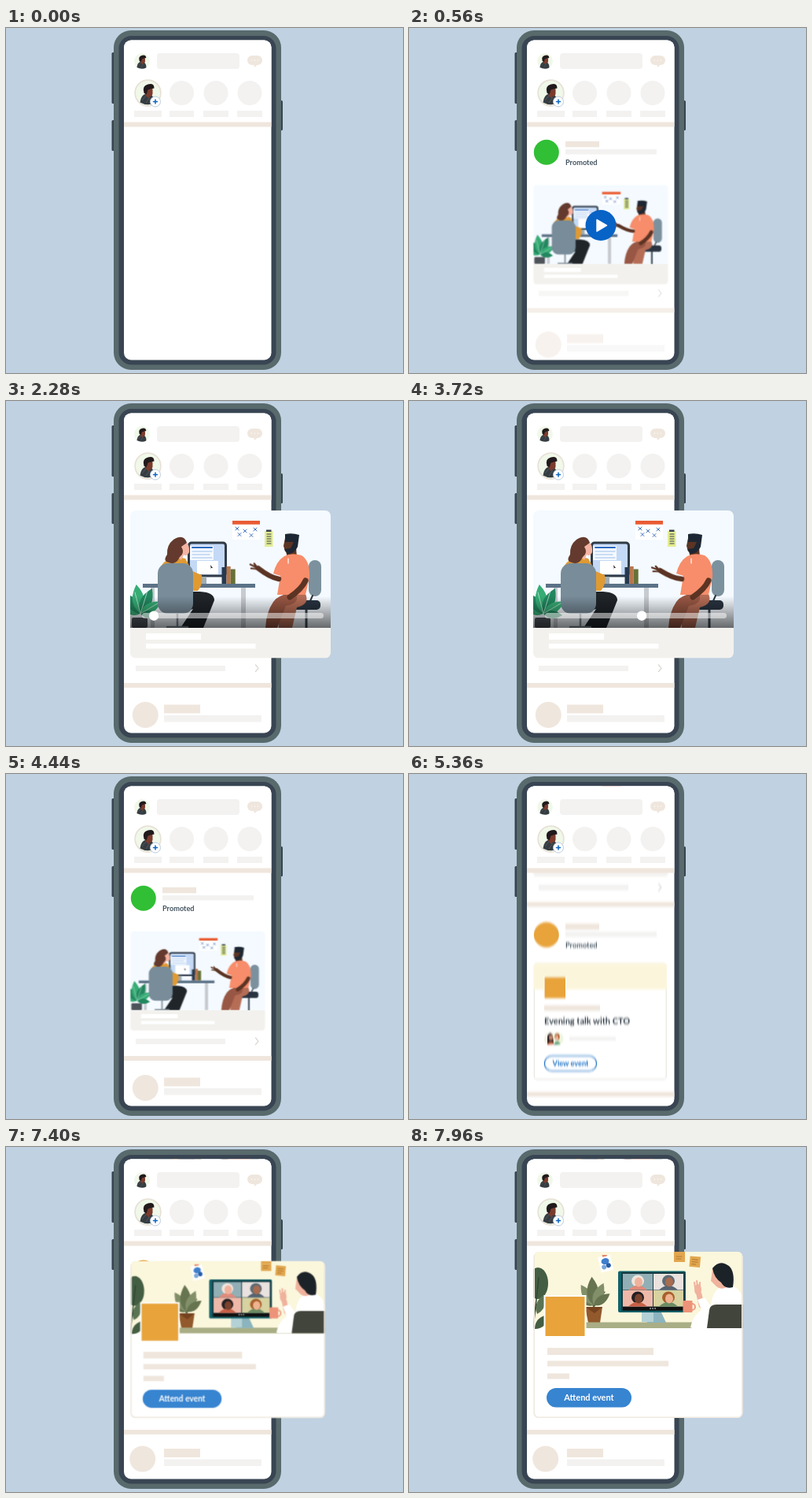
An HTML page for the animation above (8 s loop, 505x438 px).

```html
<!DOCTYPE html>
<html lang="en">
<head>
<meta charset="utf-8">
<title>Phone feed</title>
<style>
html, body { margin: 0; width: 100%; height: 100%; overflow: hidden; background: #c0d1e1; }
svg { display: block; width: 505px; height: 438px; }
text { font-family: Lato, "Open Sans", sans-serif; font-weight: 700; }
</style>
</head>
<body>
<svg id="stage" viewBox="0 0 505 438"></svg>
<script>
const LOOP = 8000, SCROLL = 240;
const SAND = '#efe6dd', GREY = '#f3f2f1', BLUE = '#0a66c2', ORANGE = '#e8a33a', SLATE = '#38434f';

const rect = (x, y, w, h, fill, r = 0, extra = '') =>
  `<rect x="${x}" y="${y}" width="${w}" height="${h}" rx="${r}" fill="${fill}" ${extra}/>`;
const oval = (x, y, rx, fill, ry = rx, extra = '') =>
  `<ellipse cx="${x}" cy="${y}" rx="${rx}" ry="${ry}" fill="${fill}" ${extra}/>`;
const shape = (d, fill) => `<path d="${d}" fill="${fill}"/>`;
const line = (d, color, w = 1) =>
  `<path d="${d}" fill="none" stroke="${color}" stroke-width="${w}" stroke-linecap="round" stroke-linejoin="round"/>`;
const group = (id, body, extra = '') => `<g id="${id}" ${extra}>${body}</g>`;
const label = (x, y, size, fill, words, extra = '') =>
  `<text x="${x}" y="${y}" font-size="${size}" fill="${fill}" ${extra}>${words}</text>`;
const at = (transform, body) => `<g transform="${transform}">${body}</g>`;

// Portrait centred on 0,0 with a radius of 15
const portrait = oval(0, 0, 15, '#f0f8e9') +
  shape('M-10 12 Q-9 3 -3 1 L5 3 Q9 7 8 13 Q-1 17 -10 12', '#363d42') +
  line('M-7 9 L-3 4 M-2 12 L2 6', '#59646a', .7) +
  shape('M-3 -6 Q3 -9 6 -5 L6 1 Q5 5 2 4 L1 7 L-3 3z', '#7b3c2d') +
  shape('M-5 0 Q-8 -9 0 -11 Q8 -13 8 -6 L3 -5 L0 -4 L-2 2z', '#211a1c');

const phone =
  rect(134.5, 31, 5, 65, SLATE, 1.5) + rect(134.5, 117, 5, 39, SLATE, 1.5) + rect(347, 92, 5, 38, SLATE, 1.5) +
  rect(137, 3, 213, 431, '#586a6c', 22) + rect(143.5, 10, 200, 417.5, '#394553', 16) +
  rect(150, 15.5, 187.5, 406, '#fff', 9);

const topBar = rect(150, 15, 188, 106, '#fff') +
  at('translate(173 42) scale(.66)', portrait) +
  rect(192, 32, 105, 20, GREY, 4) +
  rect(307, 35, 19, 12, SAND, 6) + shape('M315 45 H322 L316 50z', SAND) +
  [312.5, 316.5, 320.5].map(x => oval(x, 41, .7, '#fff')).join('') +
  oval(180.5, 82.5, 16.3, '#f5faee', 16.3, 'stroke="#e7e1d6" stroke-width="1.8"') +
  at('translate(180.5 82.5)', portrait) +
  oval(190, 93.5, 6.5, '#fff', 6.5, 'stroke="#bccddd"') + line('M187.5 93.5 H192.5 M190 91 V96', BLUE, 1.5) +
  [223.5, 267, 310].map(x => oval(x, 82.5, 15.5, GREY)).join('') +
  [[163, 35], [208, 31], [251, 32], [294, 32]].map(([x, w]) => rect(x, 105, w, 8, GREY)).join('') +
  rect(150, 119.5, 188, 6, SAND);

const postHeader = (color, y) => oval(174.8, y, 16, color) +
  rect(199, y - 14, 43, 7.5, SAND) + rect(199, y - 3.7, 116, 6.3, GREY) +
  label(199, y + 16, 9.2, '#42535f', 'Promoted');
const skeleton = (x, y) => oval(x, y, 16.5, SAND) +
  rect(201, y - 13, 46, 11, SAND) + rect(201, y + .5, 124, 8.5, GREY);

const leaf = (x, y, turn, size, color) => at(`translate(${x} ${y}) rotate(${turn}) scale(${size})`,
  shape('M0 0 Q-9 -9 0 -22 Q9 -9 0 0', color));
const crosses = [[294, 162], [304, 165], [317, 163], [297, 169.5], [312, 170.5]]
  .map(([x, y]) => line(`M${x - 2} ${y - 2} l4 4 m0 -4 l-4 4`, '#4373bd', 1)).join('');

const office =
  rect(158, 139, 255, 149, '#f4faff') +
  rect(288, 152, 35, 24, '#fff') + rect(288, 152, 35, 4.7, '#e95b32') + crosses +
  rect(329, 165, 10.5, 20, '#e3ec92') + rect(331, 163.5, 6.5, 2.5, SLATE) +
  line('M332 169 H337 M332 172 H337 M332 175 H337 M332 178 H337 M332 181 H337', '#38434f', 1.2) +
  rect(299, 236, 6, 52, '#c7cbd0') + rect(184, 236, 5, 52, '#c7cbd0') +
  rect(231, 178.5, 50, 45, '#303b47', 5) + rect(234, 181.5, 44, 39, '#c3d9f6', 2) +
  rect(234, 184, 30, 18, '#f5f9ff') + line('M237 186 H262', '#2b6bc1', 2) +
  line('M237 191 H262 M237 195 H259 M237 199 H262', '#9cbfe9', 1) +
  rect(243, 203, 27, 17, '#fff') + shape('M260 208 l3 4 -2 0 0 2z', '#222') +
  rect(247, 223, 8, 9, '#a0adb6') + rect(274.5, 211, 6, 21, '#26394f') +
  rect(280.5, 210, 5.2, 22, '#b8764d') + rect(285.7, 213.5, 6, 18.5, '#667137') +
  rect(174, 232, 143, 5, '#5c7287') +
  [[-70, 1.2], [-38, 1.5], [-8, 1.7], [25, 1.6], [60, 1.4], [95, 1.1]]
    .map(([turn, size], i) => leaf(171, 270, turn, size, i % 2 ? '#22875f' : '#36ac75')).join('') +
  line('M171 270 L164 243 M171 270 L180 241 M171 270 L193 257', '#d7f0e2', .7) +
  rect(160, 275, 20, 13, '#4d5359', 2) +
  // seated woman
  shape('M215 242 H247 Q265 243 265 253 L251 288 H222 L238 264 Q222 271 212 260z', '#20252a') +
  shape('M197 210 Q207 194 228 200 L237 216 L249 221 Q251 233 244 241 H200z', '#e09a32') +
  shape('M224 179 Q234 178 233 192 Q230 198 226 195 L223 202 L217 197z', '#f4b4a1') +
  shape('M230 180 Q226 168 213 176 Q204 183 205 195 Q199 203 207 205 Q216 209 221 198 Q228 193 223 185z', '#633a2d') +
  line('M218 268 V287 M205 287 H231', '#818d96', 2.5) +
  rect(193, 206, 45, 64, '#788c99', 13) +
  // seated man
  line('M382 263 V288', '#3b4854', 3) + rect(385, 202, 16, 46, '#7c919e', 8) +
  rect(363, 253, 37, 12, '#293440', 5) + line('M390 247 L386 256', '#293440', 2) +
  shape('M346 251 Q352 242 380 243 Q388 258 370 262 L364 288 H347z', '#b66d56') +
  shape('M340 255 Q348 243 369 246 Q374 257 356 260 L345 288 H330 Q331 268 340 255', '#985744') +
  shape('M355 187 L369 186 L370 199 H358z', '#5c3424') +
  shape('M354 197 Q363 192 376 196 Q387 203 386 224 L381 246 H345 L349 222 L340 219 Q344 203 354 197', '#f78d6a') +
  line('M359 200 V206', '#fff', 1.2) + line('M381 228 Q376 239 361 249', '#5c3424', 7) +
  shape('M355 174 H369 L369 187 Q363 196 355 191 L353 184z', '#5c3424') +
  shape('M355 169 Q364 167 373 170 L371 185 Q367 194 358 194 L354 188 L362 187 L366 179 H355z', '#1d2733');
const arm = line('M347 226 Q336 224 321 212', '#5c3424', 6.5) +
  line('M323 213 L311 207 M321 213 L312 212 M319 210 L316 206', '#5c3424', 2.2);
const caption = rect(158, 288, 255, 38.5, '#f2f1ed') + rect(178, 295, 70, 8, '#fff') + rect(178, 308, 139.5, 6.3, '#fff');
const player = rect(158, 248, 255, 40, 'url(#shade)') +
  rect(173, 269, 231, 7, '#fff', 3.5, 'opacity=".5"') +
  group('knob', oval(173, 272.7, 6.2, '#fff'));
const videoCard = (armId, extra) => `<g clip-path="url(#cardClip)">${office}${group(armId, arm)}${extra}${caption}</g>`;

const eventPost = postHeader(ORANGE, 159.5) +
  rect(159.3, 195.8, 168, 147.2, '#fff', 4, 'stroke="#ebe8e3" stroke-width="1.3"') +
  shape('M159 229 V200 Q159 195.5 163 195.5 H324 Q328 195.5 328 200 V229z', '#fbf6db') +
  rect(172, 213, 27.5, 27.5, ORANGE, 0, 'stroke="#fff"') +
  rect(172, 249, 71, 7, SAND) +
  label(172, 272.5, 11, '#303c46', 'Evening talk with CTO') +
  oval(180, 291.5, 8, '#f5eee2') + oval(188.5, 291.5, 8, '#eef5df') +
  shape('M176 298 V288 Q180 281 183 288 L184 298z', '#30282a') + oval(180.5, 290, 2.5, '#c88870', 3.2) +
  shape('M176 299 Q180 292 185 298z', '#d75f3d') +
  oval(188.5, 289, 3.2, '#a8582d', 4) + oval(188, 290, 2.2, '#f0b495', 2.8) + shape('M184 299 Q188 292 193 298z', '#38885d') +
  rect(204, 289, 59, 4.8, GREY) +
  rect(172.3, 313.3, 66.3, 19.2, '#fff', 9.6, `stroke="${BLUE}" stroke-width="1.1"`) +
  group('press', rect(174, 314.5, 63, 17, '#c5dff7', 8.5)) +
  label(205.5, 326, 9.2, BLUE, 'View event', 'text-anchor="middle"') +
  rect(150, 359, 188, 6, SAND) + skeleton(173.7, 396);

const caller = (x, y, back, skin, hair, top) => rect(x, y, 38, 20.5, back) +
  oval(x + 19, y + 9, 8, hair, 7.5) + shape(`M${x + 7} ${y + 20.5} Q${x + 19} ${y + 9} ${x + 31} ${y + 20.5}z`, top) +
  oval(x + 20, y + 10.5, 5, skin, 6);
const meeting =
  rect(158, 133, 267, 97, '#fbf7dc') +
  oval(164, 173, 13, '#435e43', 20) + leaf(163, 212, 20, 1.2, '#5a7453') + leaf(160, 231, 45, 1.2, '#435e43') +
  line('M165 166 L158 230', '#304733', 1.5) +
  at('rotate(-13 250 147)', rect(242, 138, 16, 20, '#fff') + oval(250, 145, 5, '#3e7ecc', 4) +
    oval(247, 152, 3, '#78a6da') + oval(253, 151, 3, '#265ca8') + rect(248, 136, 6, 3, '#e88467')) +
  rect(337, 130, 14, 16, '#e2a64e') + line('M340 139 H347 M340 142 H346', '#a66f2b', .8) +
  at('rotate(5 364 146)', rect(357, 139, 13.5, 13.5, '#e2a64e') + line('M360 143 H367 M360 146 H367 M360 149 H365', '#a66f2b', .8)) +
  line('M235 205 V173 M235 203 L222 180 M235 203 L249 184', '#56603f', 1.3) +
  [[-62, 1], [-32, 1.4], [-4, 1.65], [24, 1.4], [54, 1.15]]
    .map(([turn, size], i) => leaf(235, 201, turn, size, i % 2 ? '#829069' : '#66744f')).join('') +
  shape('M224 203 H246 L243 223 H228z', '#91592c') + shape('M224 203 H246 L236 211z', '#75421f') +
  rect(220, 222.5, 205, 7.5, '#a9ae86') +
  shape('M298 208 H320 L327 223 H303z', '#8bb4be') + rect(296, 208, 15, 14, '#b4d1d6') +
  rect(266, 157.5, 86, 52.5, '#12626a', 2) + rect(270, 159, 81, 49, '#173c42') +
  caller(272, 161, '#92afb6', '#efb19c', '#efe5dc', '#e28a78') +
  caller(311, 161, '#e9e2df', '#a86c50', '#5f6b75', '#566370') +
  caller(272, 182, '#efb9a9', '#79432d', '#241f22', '#c76047') +
  caller(311, 182, '#d7d2a0', '#efb390', '#a8602c', '#6c8b63') +
  rect(272, 203, 77, 4.5, '#111') + line('M307 205 h.1 M310 205 h.1 M313 205 h.1', '#fff', 1.5) +
  oval(360, 203, 4, 'none', 4, 'stroke="#ed9e86" stroke-width="2"') + rect(348.5, 195, 12, 15, '#ed9379', 1) +
  group('wave', line('M369 187 L372 201', '#f0b29d', 7) + oval(367.5, 181, 4.5, '#f0b29d', 7) +
    line('M364 179 L363 172 M367 177 L366 170 M370 179 L370 172', '#f0b29d', 2)) +
  shape('M358 229 Q361 214 372 207 L367 194 L376 191 L384 202 Q386 181 399 177 H413 Q424 183 425 196 V230 H360z', '#fff') +
  shape('M386 155 Q394 149 403 156 L404 178 Q397 182 391 177 L384 170z', '#f0b29d') +
  shape('M386 154 Q395 142 407 151 Q415 158 412 178 Q402 181 397 172 Q388 166 386 154', '#1c2328') +
  shape('M379 230 L382 207 Q383 200 391 200 H425 V230z', '#42453b');
const eventCard = `<g clip-path="url(#eventClip)">${rect(158.5, 133, 266, 211, '#fff')}${meeting}</g>` +
  rect(159.2, 133.7, 264.6, 209.6, 'none', 6, 'stroke="#f0eae0" stroke-width="1.6"') +
  `<g clip-path="url(#eventClip)">${rect(158.5, 133, 266, 4, '#fbf7dc')}${rect(337, 133, 14, 4, '#e2a64e')}</g>` +
  rect(172.5, 189, 52, 52, ORANGE, 0, 'stroke="#fff" stroke-width="2"') +
  rect(176, 255, 135, 9, SAND) + rect(176, 271.5, 154, 7, SAND) + rect(176, 287.5, 28, 7, SAND) +
  group('attend', rect(175, 306, 108, 24.5, '#3784d0', 12.2) +
    label(229, 322, 11, '#fff', 'Attend event', 'text-anchor="middle"'));

const small = 'translate(0px, 60.5px) scale(.6735)';
const defs = `<defs>
  <clipPath id="screen">${rect(150, 15.5, 187.5, 406, '#fff', 9)}</clipPath>
  <clipPath id="cardClip">${rect(158, 139, 255, 187.5, '#fff', 7)}</clipPath>
  <clipPath id="eventClip">${rect(158.5, 133, 266, 211, '#fff', 7)}</clipPath>
  <linearGradient id="shade" x2="0" y2="1"><stop stop-opacity="0"/><stop offset="1" stop-opacity=".58"/></linearGradient>
  <filter id="smear" filterUnits="userSpaceOnUse" x="140" y="0" width="210" height="438"
    color-interpolation-filters="sRGB"><feGaussianBlur stdDeviation="0 1.5"/></filter></defs>`;

document.getElementById('stage').innerHTML = defs + rect(0, 0, 505, 438, '#c0d1e1') + phone +
  `<g clip-path="url(#screen)">` +
    group('smearLayer', group('feed',
      group('head', postHeader('#31bf35', 157.8)) +
      group('restCard', `<g style="transform-origin:158px 139px;transform:${small}">${videoCard('restArm', '')}</g>`) +
      group('foot', rect(165, 336, 114, 7, GREY) + line('M317.5 335 L321 339.3 L317.5 343.5', '#d9d6d0', 1.2) +
        rect(150, 358, 188, 6, SAND)) +
      group('next', skeleton(177.3, 398.5)) +
      at(`translate(0 ${SCROLL})`, group('eventPost', eventPost)))) +
    topBar + '</g>' +
  group('liveCard', group('zoom', videoCard('liveArm', group('player', player)), 'style="transform-origin:158px 139px"')) +
  group('playFade', group('play', oval(244, 250.5, 19.5, '#0763c5') + shape('M239 243.5 L251.5 250.7 L239 258z', '#fff') +
    line('M239 243.5 L251.5 250.7 L239 258z', '#fff', 1.5), 'style="transform-origin:244px 250.5px"')) +
  group('eventCard', eventCard, 'style="transform-origin:159px 133px"');

// Each step is [time in ms, value, easing towards the next step].
function play(id, prop, steps) {
  const full = [[0, steps[0][1]], ...steps, [LOOP, steps.at(-1)[1]]];
  document.getElementById(id).animate(
    full.map(([t, value, easing = 'linear']) => ({ offset: t / LOOP, [prop]: value, easing })),
    { duration: LOOP, iterations: Infinity });
}
const move = (id, steps) => play(id, 'transform', steps);
const fade = (id, from, to, a = 0, b = 1) => play(id, 'opacity', [[from, a], [to, b]]);
const swap = (id, time, a, b) => play(id, 'opacity', [[time, a], [time, b]]);
const shiftY = y => `translateY(${y}px)`;
const SMOOTH = 'ease-in-out', OUT = 'ease-out';

// posts arrive
fade('head', 40, 400);
move('head', [[40, shiftY(-6), OUT], [520, shiftY(0)]]);
play('liveCard', 'opacity', [[120, 0], [500, 1], [4600, 1], [4600, 0]]);
move('liveCard', [[120, shiftY(-8), OUT], [640, shiftY(0)]]);
fade('foot', 280, 720);
move('foot', [[280, shiftY(-8), OUT], [840, shiftY(0)]]);
play('next', 'opacity', [[320, 0], [800, 1], [4900, 1], [5120, 0]]);
move('next', [[320, shiftY(8), OUT], [920, shiftY(0)]]);

// play button pressed, video opens and closes
play('playFade', 'opacity', [[200, 0], [520, 1], [1720, 1], [1880, 0]]);
move('play', [[1000, 'scale(1)', SMOOTH], [1240, 'scale(.84)', SMOOTH], [1480, 'scale(1)']]);
move('zoom', [[1720, small, SMOOTH], [2200, 'scale(1)'], [4040, 'scale(1)', SMOOTH], [4440, small]]);
play('player', 'opacity', [[1960, 0], [2200, 1], [4000, 1], [4200, 0]]);
move('knob', [[2080, 'translateX(0)'], [4080, 'translateX(150px)']]);
document.getElementById('liveArm').style.transformOrigin = '347px 226px';
move('liveArm', [[1720, 'rotate(-8deg)', SMOOTH], [2200, 'rotate(0deg)', SMOOTH], [2640, 'rotate(-12deg)', SMOOTH],
  [3080, 'rotate(4deg)', SMOOTH], [3520, 'rotate(-10deg)', SMOOTH], [4040, 'rotate(0deg)']]);
swap('restCard', 4600, 0, 1);

// feed scrolls on
move('feed', [[4800, shiftY(0), SMOOTH], [5600, shiftY(-SCROLL)]]);
play('smearLayer', 'filter', [[4960, 'none'], [4960, 'url(#smear)', 'steps(1)'], [5480, 'url(#smear)'], [5480, 'none']]);
fade('eventPost', 4880, 5120);

// event opens
play('press', 'opacity', [[6040, 0, SMOOTH], [6240, 1], [6320, 1, SMOOTH], [6520, 0]]);
fade('eventCard', 7040, 7240);
move('eventCard', [[7040, 'translate(0px, 62px) scale(.635, .702)', SMOOTH], [7560, 'none']]);
document.getElementById('wave').style.transformOrigin = '372px 201px';
move('wave', [[7400, 'rotate(0deg)', SMOOTH], [7600, 'rotate(9deg)', SMOOTH], [7800, 'rotate(-5deg)', SMOOTH], [7960, 'rotate(0deg)']]);
</script>
</body>
</html>
```
